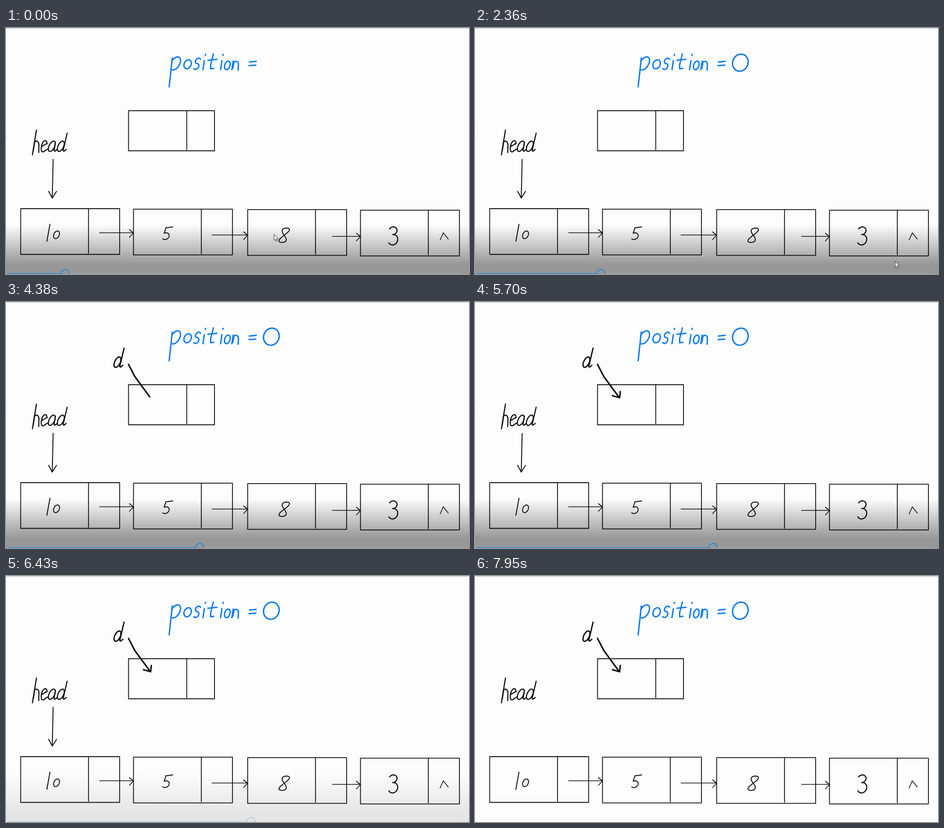
An HTML page with a canvas that plays this animation: 1026 by 546 pixels, repeating every 8 s.

```html
<!DOCTYPE html>
<html lang="en">
<head>
<meta charset="utf-8">
<title>Linked list insertion</title>
<style>
html, body { margin: 0; width: 100%; height: 100%; overflow: hidden; background: #fdfdfd; }
canvas { display: block; width: 100vw; height: 100vh; }
</style>
</head>
<body>
<canvas id="stage" width="1026" height="546"></canvas>
<script>
const W = 1026, H = 546, LOOP = 8000, STEP = 135;
const FADE_START = 5877, FADE_END = 6490, MOUSE_GONE = 3690;
const BLACK = '#0a0a0a', BLUE = '#0b7bee', BAR = '#1c8ad8';
const ctx = document.getElementById('stage').getContext('2d');

const span = (t, a, b) => Math.max(0, Math.min(1, (t - a) / (b - a)));

// Linear motion through keys of [time, ...values]
function track(keys, t) {
  const i = Math.max(1, keys.findIndex(k => k[0] >= t));
  const past = t >= keys[keys.length - 1][0];
  const a = keys[past ? keys.length - 2 : i - 1], b = keys[past ? keys.length - 1 : i];
  const u = span(t, a[0], b[0]);
  return b.slice(1).map((v, j) => a[j + 1] + (v - a[j + 1]) * u);
}

// Pen shapes: each returns a list of points; angles are in turns, clockwise from the right
const sample = (fn, n = 40) => Array.from({ length: n + 1 }, (_, i) => fn(i / n));
const line = (...pts) => pts;
const oval = (cx, cy, rx, ry, slant = 0, from = -0.25, to = from - 1) => sample(u => {
  const a = 2 * Math.PI * (from + (to - from) * u);
  return [cx + rx * Math.cos(a) - slant * ry * Math.sin(a), cy + ry * Math.sin(a)];
});

// Pen draws the first part (0 to 1) of a path
function ink(pts, width, color = BLACK, part = 1) {
  if (part <= 0) return;
  let length = 0;
  ctx.beginPath();
  pts.forEach(([x, y], i) => {
    ctx.lineTo(x, y);
    if (i) length += Math.hypot(x - pts[i - 1][0], y - pts[i - 1][1]);
  });
  ctx.strokeStyle = color;
  ctx.lineWidth = width;
  ctx.setLineDash(part < 1 ? [length * part, length] : []);
  ctx.stroke();
  ctx.setLineDash([]);
}

// Letters: lists of strokes, placed by their middle or foot
const o = (x, y, rx, ry) => [oval(x, y, rx, ry, 0.2)];
const i = (x, foot) => [line([x + 3, foot - 20], [x, foot]), line([x + 6, foot - 34], [x + 5, foot - 32])];
const p = (x, y) => [
  line([x, y - 12], [x - 3, y + 16], [x - 7, y + 52]),
  oval(x + 7, y, 10, 14.5, 0.35, -0.45, 0.28)];
const s = (x, y) => [[
  ...oval(x + 2, y - 6.5, 5.5, 6, 0.3, -0.1, -0.75),
  ...oval(x - 2, y + 6, 5.5, 6.5, 0.3, -0.25, 0.38)]];
const t = (x, y) => [
  line([x + 3, y - 18], [x - 3, y + 6], [x - 3, y + 15], [x + 4, y + 14]),
  line([x - 9, y - 4], [x + 11, y - 6])];
const arch = (x, foot, h) => [
  [x - 7, foot - 4], [x - 5, foot - h * 0.65],
  ...oval(x, foot - h * 0.65, 5.5, h * 0.33, 0, -0.45, 0), [x + 5, foot]];
const n = (x, foot) => [line([x - 6, foot - 20], [x - 9, foot - 1]), arch(x, foot, 20)];
const h = (x, foot) => [line([x, foot - 50], [x - 9, foot + 5]), arch(x, foot, 26)];
const e = (x, y) => [[[x - 6, y + 1], [x + 4, y - 5],
  ...oval(x, y, 6, 12.5, 0.2, -0.07, -0.85), [x + 8, y + 6]]];
const bowl = (x, y, rise) => [
  oval(x, y, 6.5, 11.5, 0.35, -0.1),
  line([x + 8 + rise * 0.3, y - 9 - rise], [x + 5, y + 10], [x + 7, y + 11], [x + 12, y + 7])];

const position = [
  ...p(368, 78), ...o(402, 80, 8, 10), ...s(423, 79), ...i(436, 92), ...t(456, 75),
  ...i(475, 92), ...o(490, 82.5, 6, 9.5), ...n(509, 93),
  line([539, 75], [554, 73.5]), line([538, 83], [553, 82])];
const zero = oval(587.5, 76.5, 17.3, 19, 0.08);
const head = [...h(67, 276), ...e(84, 262), ...bowl(101, 262, 0), ...bowl(121, 262, 20)];
const [dBowl, dStem] = bowl(246.5, 133, 22);

const ten = [line([97, 435], [90, 473]), oval(111.5, 458.5, 6.3, 8.5, 0.25)];
const five = [line([354, 443], [369, 441]),
  [[354, 443], [350, 455], ...oval(353, 461.5, 8, 7.5, 0.2, -0.25, 0.36)]];
const eight = [sample(u => {
  const a = 2 * Math.PI * u;
  return [616 + 8 * Math.sin(2 * a) + 5 * Math.cos(a), 459.5 - 16 * Math.cos(a)];
})];
const three = [[...oval(857, 449.5, 9, 8.5, 0.1, -0.42, 0.25),
  ...oval(857, 469.5, 10.5, 11.5, 0.1, -0.25, 0.4)]];

const write = (strokes, width, color) => strokes.forEach(k => ink(k, width, color));

function node(x, y, w, h, split) {
  ink([[x, y], [x + w, y], [x + w, y + h], [x, y + h], [x, y]], 1.8);
  ink(line([x + split, y], [x + split, y + h - 2.5]), 1.8);
}

function link(x0, x1, y) {
  ink(line([x0, y], [x1, y]), 1.7);
  ink(line([x1 - 9, y - 7], [x1, y + 0.5], [x1 - 9, y + 10]), 1.7);
}

function cursor([x, y]) {
  ctx.save();
  ctx.translate(x, y);
  const tip = new Path2D('M0 0V13.5L3 10.8L5 15.5L7.2 14.6L5.2 10H9Z');
  ctx.fillStyle = '#fff';
  ctx.fill(tip);
  ctx.strokeStyle = '#222';
  ctx.lineWidth = 1;
  ctx.stroke(tip);
  ctx.restore();
}

const shade = ctx.createLinearGradient(0, 436, 0, 525);
shade.addColorStop(0, 'rgba(0,0,0,0)');
shade.addColorStop(1, 'rgba(0,0,0,.405)');

const knobPath = [[0, 131], [1100, 205], [2360, 283], [4380, 434], [FADE_START, 543]];
const mousePath = [[300, 594, 458], [1000, 781, 527], [1250, 781, 527], [2200, 931, 518],
  [3400, 932, 519], [MOUSE_GONE, 957, 547]];

function controls(time) {
  ctx.globalAlpha = 1 - span(time, FADE_START, FADE_END);
  ctx.fillStyle = shade;
  ctx.fillRect(0, 436, W, H - 436);

  const [x] = track(knobPath, time);
  ctx.fillStyle = 'rgba(255,255,255,.2)';
  ctx.fillRect(x + 9, 544.5, 1000 - x, 1.5);
  ctx.fillStyle = BAR;
  ctx.fillRect(4, 544.5, x - 13, 1.5);
  ink(oval(x, 545, 9, 9), 2, BAR);
  for (const y of [221.5, 242.5]) ink(oval(0, y, 2, 2), 1, '#cfcfcf');
  ctx.globalAlpha = 1;
}

function drawList() {
  const xs = [32, 282, 535, 785], starts = [207, 456, 723], heights = [454, 459, 462];
  xs.forEach((x, k) => {
    node(x, 400.5 + k * 1.1, 219.3, 101.5, 150.3);
    if (k < 3) link(starts[k], xs[k + 1], heights[k]);
  });
  write([...ten, ...five, ...eight], 2);
  write(three, 2.4);
  ink(line([961.5, 470], [968.5, 454], [979.5, 468]), 1.6);
}

function draw(time) {
  ctx.fillStyle = '#fdfdfd';
  ctx.fillRect(0, 0, W, H);
  ctx.fillStyle = '#ababab';
  ctx.fillRect(0, 0, W, 1);
  ctx.lineCap = ctx.lineJoin = 'round';

  ctx.save();
  ctx.translate(0.5, 0.5);
  write(position, 3, BLUE);
  ink(zero, 3.2, BLUE, span(time, 400, 950));
  node(271, 183, 190.5, 89, 129);
  drawList();

  write(head, 2.4);
  if (time < 7020) {
    ink(line([104, 291], [102, 376]), 2);
    ink(line([94, 362], [102, 377], [111.5, 362]), 2);
  }

  ink(dBowl, 2.8, BLACK, span(time, 2500, 2900));
  ink(dStem, 2.8, BLACK, span(time, 2900, 3250));
  ink(line([271, 138], [285, 165], [318, 210]), 3.3, BLACK, span(time, 3400, 4000));
  ink(line([304, 207.5], [320, 212], [321.5, 198]), 3.2, BLACK, span(time, 4600, 5200));
  ctx.restore();

  controls(time);
  if (time < MOUSE_GONE) cursor(track(mousePath, time));
}

function frame() {
  const now = performance.now() % LOOP;
  draw(Math.floor(now / STEP) * STEP);
  requestAnimationFrame(frame);
}
frame();
</script>
</body>
</html>
```
